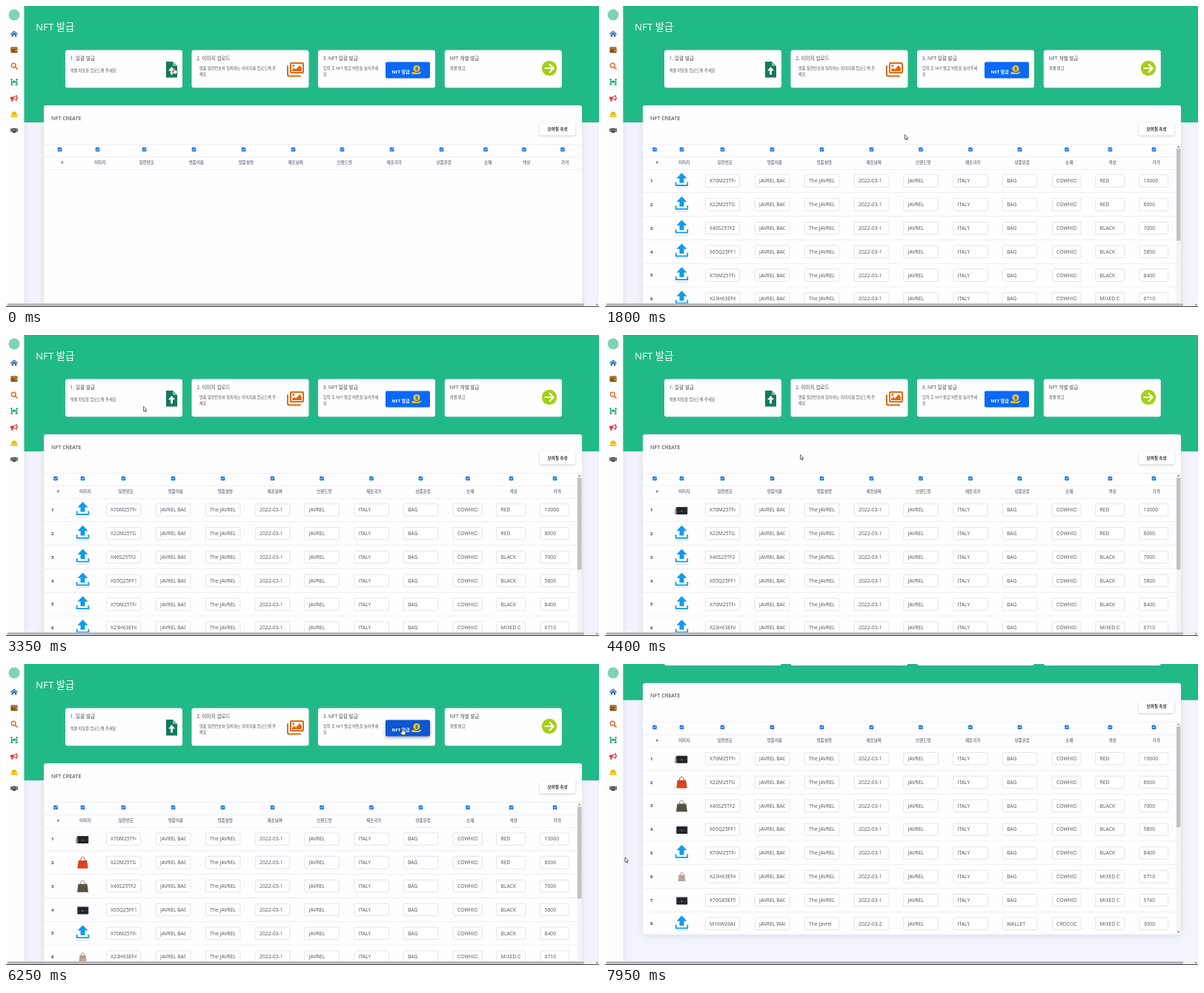
An HTML page for the animation above (8 s loop, 800 by 406 pixels).

```html
<!DOCTYPE html>
<html lang="ko">
<head>
<meta charset="utf-8">
<style>
  html, body { margin: 0; width: 100%; height: 100%; overflow: hidden; background: #f3f4fb; }
  svg { display: block; }
  text { font-family: "Open Sans", "Noto Sans CJK KR", sans-serif; white-space: pre; }
  .card { filter: drop-shadow(0 1px 5px #8898aa40); }
  .button { filter: drop-shadow(0 1px 1.5px #0003); }
  .hover { filter: drop-shadow(0 2px 2px #0005); }
</style>
</head>
<body>
<svg id="stage" width="800" height="406"></svg>
<script>
const LOOP = 8000, TABLE_AT = 900, SCROLL_AT = 6850, SCROLL = 108.3;
const ROW_TOP = 220, ROW_H = 31.8;

const rect = (x, y, w, h, fill, r = 0, extra = '') =>
  `<rect x="${x}" y="${y}" width="${w}" height="${h}" rx="${r}" fill="${fill}" ${extra}/>`;
const text = (x, y, s, size, fill = '#555', extra = '') =>
  `<text x="${x}" y="${y}" font-size="${size}" fill="${fill}" ${extra}>${s}</text>`;
const path = (d, fill, extra = '') => `<path d="${d}" fill="${fill}" ${extra}/>`;
const line = (d, color, width) =>
  path(d, 'none', `stroke="${color}" stroke-width="${width}" stroke-linecap="round" stroke-linejoin="round"`);
const circle = (x, y, r, fill, extra = '') => `<circle cx="${x}" cy="${y}" r="${r}" fill="${fill}" ${extra}/>`;
const group = (x, y, body, extra = '') => `<g transform="translate(${x} ${y})" ${extra}>${body}</g>`;
const rule = y => rect(51, y, 726, .6, '#e6e8ee');
const MIDDLE = 'text-anchor="middle" ', BOLD = 'font-weight="700"';

// Table
const labels = ['#', '이미지', '일련번호', '명품이름', '명품설명', '제조날짜', '브랜드명', '제조국가', '상품분류', '소재', '색상', '가격'];
const emptyColumns = [72.5, 123.5, 186.5, 253.5, 320.5, 387.5, 453.5, 520.5, 587.5, 647, 699, 751];
const fullColumns = [67, 103.5, 158.5, 225.5, 292.5, 359.5, 426, 493, 559.5, 623, 681.5, 740.5];

const checkbox = x => group(x, 193.5,
  rect(-2.8, -2.8, 5.6, 5.6, '#1473dc', 1) + line('M-1.5 0L-.4 1.2 1.6-1.3', '#fff', .9));
const header = columns => columns.map((x, i) =>
  checkbox(x) + text(x + 3.2, 213, labels[i], 5.6, '#7b8190', MIDDLE + BOLD)).join('');

const items = [
  ['X76M25TF4', 'RED', '10000'], ['X22M25TG', 'RED', '8000'], ['X46S25TF2', 'BLACK', '7000'],
  ['X65Q25FF1', 'BLACK', '5800'], ['X76M25TF4', 'BLACK', '8400'], ['X23H63EF4', 'MIXED COLOR', '6710'],
  ['X76G85EF5', 'MIXED COLOR', '5740'], ['M16W26AB', 'MIXED COLOR', '3000', true]
];

const field = (x, w, y, value) =>
  rect(x, y - 8.2, w, 16.4, '#fff', 1.5, 'stroke="#dcdfe6" stroke-width=".8"') +
  `<svg x="${x + 5.8}" y="${y - 8}" width="${w - 11.8}" height="16">${text(0, 10.4, value, 6.8, '#4e535c')}</svg>`;

const uploadIcon =
  path('M0-11L7-3.6H3V2.6H-3V-3.6H-7Z', '#109bea') +
  line('M-7.8 2.2V6H7.8V2.2', '#109bea', 1.8) +
  text(0, 10, 'IMAGE UPLOAD', 2.4, '#79b4d8', MIDDLE);

const tote = (color, w, h, trim) =>
  line(`M${-w * .24} ${-h * .2}Q${-w * .18} ${-h * .58} 0 ${-h * .58}T${w * .24} ${-h * .2}`, trim, .8) +
  path(`M${-w * .4} ${-h * .25}H${w * .4}L${w * .5} ${h * .5}H${-w * .5}Z`, color) +
  line(`M${-w * .38} ${-h * .2}L0 0 ${w * .38} ${-h * .2}`, trim, .5);
const clutch = strap =>
  (strap ? line('M-7-4Q-10 2-8 5', '#333', .9) : '') +
  rect(-7.2, -4.8, 15, 10, '#222228', 1.2) + line('M-6.5-4H7V1H-6.5', '#45454d', .6) +
  rect(-1, 0, 2, 1.4, '#8b8579', .4);
const photos = {
  0: clutch(true), 1: tote('#dc4420', 14.5, 14.5, '#a82e18'), 2: tote('#55513f', 15, 14.5, '#83744f'),
  3: clutch(false), 5: tote('#b6a797', 10, 11, '#887c72'), 6: clutch(false)
};

const tableRow = ([serial, color, price, wallet], i) => {
  const y = ROW_TOP + ROW_H * i + 16;
  const values = [serial, wallet ? 'JAVREL WALLET' : 'JAVREL BAG', wallet ? 'The Javrel' : 'The JAVREL',
    wallet ? '2022-03-2' : '2022-03-1', 'JAVREL', 'ITALY', wallet ? 'WALLET' : 'BAG',
    wallet ? 'CROCODILE' : 'COWHIDE', color, price];
  const fields = values.map((v, c) => {
    const w = c < 7 ? 46.5 : 38.8;
    return field(fullColumns[c + 2] - (c < 7 ? 23.2 : 19.7), w, y, v);
  }).join('');
  return text(61, y + 2.1, i + 1, 6, '#444', BOLD) +
    group(103.5, y, uploadIcon, `id="upload${i}"`) +
    (photos[i] ? group(103.5, y + .8, photos[i], `id="photo${i}"`) : '') +
    fields + rule(y + 15.5);
};

const scrollbar = rect(770.5, 186.5, 6.5, 286, '#f4f4f6') +
  rect(771, 192.5, 5.5, 124, '#c2c2c4', 0, 'id="thumb"') +
  path('M772.3 190.5L773.7 188.6 775.1 190.5Z', '#666') + path('M772.3 469L773.7 471 775.1 469Z', '#555');

// Step cards
const dollarHand = group(554, 86,
  circle(0, -1.5, 4.6, '#f6c21c') + text(0, 1, '$', 6.5, '#0a58d0', MIDDLE + BOLD) +
  path('M-6.5 3H-3L-1 4H2L6 2.6 6.6 3.5 3 6H-6.5Z', '#f6c21c'));
const fileIcon = path('M216 75H225L231 81V96.5H216Z', '#13795b') + path('M225 75V81H231Z', '#82b7a6') +
  path('M223.5 82L228 87.2H225V92.5H222V87.2H219Z', '#fff');
const imagesIcon = line('M380 81V92.5Q380 94.5 382 94.5H397', '#e0690f', 2) +
  rect(383, 76, 19, 15, '#e0690f', 2) + rect(385, 78, 15, 11, '#fff', .5) +
  circle(387.8, 80.6, 1.5, '#e0690f') + path('M386 88V86L389 83.5 391 85.5 396 80 399 83.5V88Z', '#e0690f');
const arrowIcon = circle(733, 84, 10.2, '#a5cf16') + line('M727.5 84H738M733.7 79L738.7 84 733.7 89', '#fff', 2.2);

const stepCard = (x, title, ...lines) =>
  rect(x, 59.5, 158, 50.8, '#fefefe', 3, 'class="card"') + text(x + 6.8, 73.4, title, 6.6, '#484848') +
  lines.map(([dx, y, s]) => text(x + dx, y, s, 5.25, '#555')).join('');

const steps =
  stepCard(80, '1. 일괄 발급', [6.5, 89, '엑셀 파일을 업로드해 주세요']) + fileIcon +
  stepCard(250.5, '2. 이미지 업로드', [10.2, 85.8, '명품 일련번호와 일치하는 이미지를 업로드해 주'], [10.2, 93.6, '세요']) + imagesIcon +
  stepCard(421, '3. NFT 일괄 발급', [7, 85.8, '입력 후 NFT 발급 버튼을 눌러주세'], [7, 93.6, '요']) +
  rect(512, 75.5, 60, 22, '#0a69fb', 2, 'id="issue"') + text(520.5, 90.5, 'NFT 발급', 6, '#fff', BOLD) + dollarHand +
  stepCard(591.8, 'NFT 개별 발급', [7, 85.8, '개별 발급']) + arrowIcon;

const tableCard =
  rect(51, 134, 726, 339, '#fefdff', 3, 'class="card"') +
  text(61, 153.6, 'NFT CREATE', 7.3, '#333', 'font-weight="500"') +
  rect(720, 157, 48, 17.5, '#fff', 2.5, 'class="button"') +
  text(744, 167.8, '보여질 속성', 5.6, '#333', MIDDLE + BOLD) +
  rule(186) + rule(203.3) + rule(220) +
  `<g id="empty">${header(emptyColumns)}</g>` +
  `<g id="full">${header(fullColumns)}${items.map(tableRow).join('')}${scrollbar}</g>`;

// Sidebar
const house = path('M-5 0L0-4.3 5 0 4.2 .9 0-2.7-4.2 .9Z', '#2f6fb5') + path('M-3.4 .9L0-2 3.4 .9V4H1V1.5H-1V4H-3.4Z', '#2f6fb5');
const wallet = rect(-4.6, -4, 9.2, 8, '#8f5713', 1.2) + rect(-3.6, -2.6, 8, .8, '#d8b98d') + circle(2.7, .9, .9, '#f5e4c9');
const search = circle(-.8, -.8, 2.9, 'none', 'stroke="#e9662c" stroke-width="1.4"') + line('M1.5 1.5L4 4', '#e9662c', 1.6);
const carriers = [-3.6, 3.6].map(x => circle(x, -3.4, 1.2, '#22a878') +
  line(`M${x}-1.5V1.5L${x * 1.1} 4M${x} 1L${x * .6} 4M${x}-1L${x * .4} .5`, '#22a878', 1.2)).join('') +
  rect(-1.7, -2, 3.4, 3, '#22a878');
const bullhorn = path('M-5-1.8H-1L4-4.3V3.8L-1 1.5H-5Z', '#e5383b') + rect(-3.8, 1, 2.2, 3.5, '#e5383b', .5) +
  path('M-.2-1L3-2.6V2L-.2 .6Z', '#fff') + rect(4, -1.3, 1, 2, '#e5383b', .5);
const helmet = path('M-4 1.5Q-4-3.4 0-3.4T4 1.5Z', '#edc415') + rect(-5, 1.8, 10, 2, '#edc415', 1) + line('M-1.3-3V0M1.3-3V0', '#cfa70c', .6);
const handshake = path('M-5-2.5H-3L-1-3H1L3-2.5H5V2H3.5L1 3.5H-.5L-3.5 2H-5Z', '#4d4d4d') + line('M-2 .5L0-1.3 2.6 1.2M-3.6-2V1.6M3.7-2V1.6', '#ddd', .6);
const sidebar = rect(0, 0, 24.4, 401, '#fefefe', 0, 'class="card"') + circle(11, 12, 7.5, '#7fd3b4') +
  [house, wallet, search, carriers, bullhorn, helmet, handshake].map((icon, i) => group(11, 37.5 + 21.7 * i, icon)).join('');

const bottomBar = rect(0, 401, 800, 5, '#f0f0f2') + rect(2, 401.3, 778, 3.3, '#b4b4b6') +
  path('M796.5 401.6L798.5 403 796.5 404.4Z', '#555') + rect(0, 405, 800, 1, '#444');

const OUTLINE = 'stroke="#333" stroke-width=".7" stroke-linejoin="round"';
const pointers =
  `<g id="pointer"><g id="arrow">${path('M0 0V6.3L1.5 5 2.5 7.4 3.5 7 2.5 4.7H4.5Z', '#fff', OUTLINE)}</g>` +
  `<g id="hand">${path('M-.8 .4Q0-.6 .8 .4V3.2L3.8 4Q4.4 4.3 4.2 5.5L3.5 8.8H-.6L-3 5.2Q-3 4.2-.8 5.3Z', '#fff', OUTLINE)}</g></g>`;

document.getElementById('stage').innerHTML =
  rect(0, 0, 800, 406, '#f3f4fb') +
  `<g id="page">${rect(0, 0, 800, 157, '#20ba87')}${text(40, 33, 'NFT 발급', 13.3, '#fff')}${steps}${tableCard}</g>` +
  sidebar + bottomBar + pointers;

// Motion
const el = id => document.getElementById(id);
const show = (id, on) => el(id).setAttribute('display', on ? 'inline' : 'none');
const route = [
  [0, 227, 83], [350, 227, 83], [1100, 404.5, 173.5], [1850, 404.5, 173.5], [2300, 388, 84], [2600, 388, 84],
  [3300, 185.5, 96.5], [3500, 185.5, 96.5], [4200, 263.5, 161.5], [4900, 263.5, 161.5],
  [5800, 535, 87], [SCROLL_AT - 1, 535, 87], [SCROLL_AT, 27, 261], [LOOP, 27, 261]
];

function pointerAt(t) {
  const i = route.findIndex(p => p[0] > t);
  const [t0, x0, y0] = route[i - 1], [t1, x1, y1] = route[i];
  const u = (t - t0) / (t1 - t0), k = u * u * (3 - 2 * u);
  return [x0 + (x1 - x0) * k, y0 + (y1 - y0) * k];
}

function draw(t) {
  const [x, y] = pointerAt(t), scrolled = t >= SCROLL_AT;
  const within = (l, top, r, b) => !scrolled && x > l && x < r && y > top && y < b;
  const onIssue = within(512, 75, 572, 98);
  const clickable = onIssue || within(215, 75, 232, 97) || within(379, 75, 403, 96);

  el('page').setAttribute('transform', `translate(0 ${scrolled ? -SCROLL : 0})`);
  show('empty', t < TABLE_AT);
  show('full', t >= TABLE_AT);
  el('thumb').setAttribute('height', scrolled ? 136 : 124);
  for (const i in photos) {
    const loaded = t >= (i == 0 ? 4300 : 4400 + 90 * i);
    show('photo' + i, loaded);
    show('upload' + i, !loaded);
  }
  el('issue').setAttribute('fill', onIssue ? '#0b57d4' : '#0a69fb');
  el('issue').setAttribute('class', onIssue ? 'hover' : '');
  el('pointer').setAttribute('transform', `translate(${x} ${y})`);
  show('hand', clickable);
  show('arrow', !clickable);
}

function tick() {
  draw(performance.now() % LOOP);
  requestAnimationFrame(tick);
}
tick();
</script>
</body>
</html>
```
